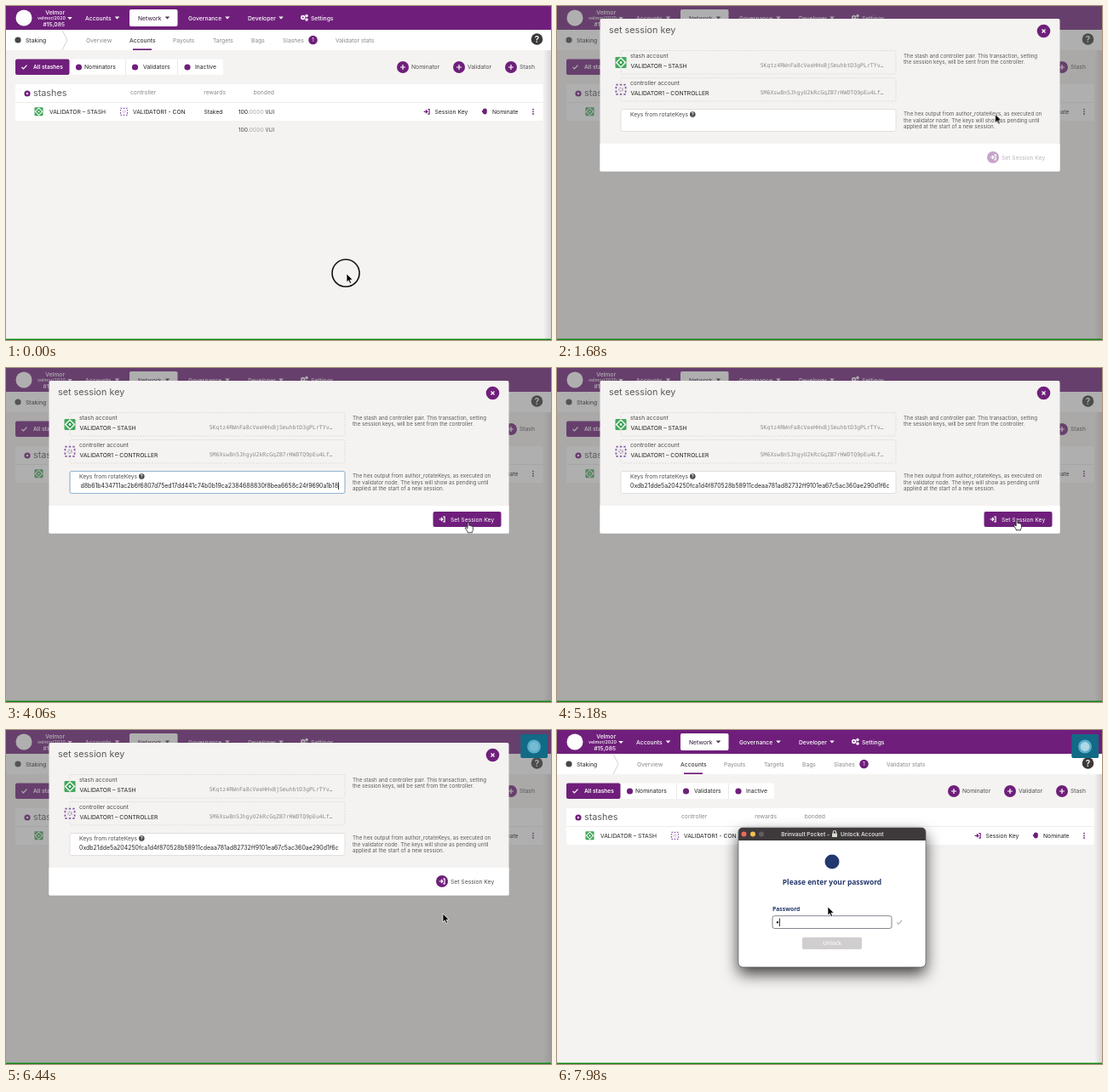
Animation, 640 px wide and 393 px high, one loop 8000 ms. Source, as an HTML page:

```html
<!DOCTYPE html>
<html lang="en">
<head>
<meta charset="utf-8">
<title>Staking session key</title>
<style>
html, body { margin: 0; width: 100%; height: 100%; overflow: hidden; background: #f5f3f1; }
svg { display: block; }
#stage { width: 100vw; height: 100vh; }
text { font: 6.75px Inter, "Liberation Sans", sans-serif; fill: #4e4e4e; white-space: pre; }
.purple { fill: #6f1f7b; }
.white, .white text { fill: #fff; }
.nav text { font-weight: 500; fill: #fff; }
.tabs text, .muted { fill: #8b8888; }
.tabs .on { fill: #3f3f3f; font-weight: 500; }
.title { font-size: 10.8px; font-weight: 400; fill: #5a5858; }
.dark { fill: #222; }
.bold { font-weight: 600; }
.end { text-anchor: end; }
.mid { text-anchor: middle; }
.help text { font-size: 6.2px; fill: #5c5a5a; }
.mono { font: 6.5px "DejaVu Sans Mono", monospace; fill: #8d8b8b; }
.hex { font-size: 6.94px; fill: #222; }
.line { fill: none; stroke: currentColor; stroke-width: 1.2; }
.dash { fill: none; stroke: #d9d6d4; stroke-width: .8; stroke-dasharray: 2 1.4; }
.popup text { font-family: "Noto Sans", "Open Sans", sans-serif; font-weight: 600; fill: #26396b; }
.popup .bar { font: 600 6.6px Inter, "Liberation Sans", sans-serif; fill: #dedbdc; }

/* timeline: one loop, hard switches */
.t { animation: 8s step-end infinite; }
.ring { animation-name: ring; }
.row-hover { animation-name: rowHover; }
.set { animation-name: set; }
.sign { animation-name: sign; }
.ready { animation-name: ready; }
.focus { animation-name: focus; }
.empty { animation-name: empty; }
.pasted { animation-name: pasted; }
.blurred { animation-name: blurred; }
.set-hover { animation-name: setHover; }
.sign-hover { animation-name: signHover; }
.status { animation-name: status; }
.sending { animation-name: sending; }
.window { animation-name: window; }
.typed { animation-name: typed; }
.arrow { animation-name: arrow; }
.hand { animation-name: hand; }
.beam { animation-name: beam; }
@keyframes ring { 0% { opacity: 1 } 1.75%, to { opacity: 0 } }
@keyframes rowHover { 0% { opacity: 0 } 11% { opacity: 1 } 18.4%, to { opacity: 0 } }
@keyframes set { 0% { opacity: 0 } 18.4% { opacity: 1 } 84%, to { opacity: 0 } }
@keyframes sign { 0% { opacity: 0 } 66.5% { opacity: 1 } 78.7%, to { opacity: 0 } }
@keyframes ready { 0% { opacity: .4 } 33.2%, to { opacity: 1 } }
@keyframes focus { 0% { opacity: 0 } 30% { opacity: 1 } 63.5%, to { opacity: 0 } }
@keyframes empty { 0% { opacity: 1 } 33.2%, to { opacity: 0 } }
@keyframes pasted { 0% { opacity: 0 } 33.2% { opacity: 1 } 63.5%, to { opacity: 0 } }
@keyframes blurred { 0% { opacity: 0 } 63.5%, to { opacity: 1 } }
@keyframes setHover { 0% { opacity: 0 } 46.3% { opacity: 1 } 66.5%, to { opacity: 0 } }
@keyframes signHover { 0% { opacity: 0 } 75.2% { opacity: 1 } 78.7%, to { opacity: 0 } }
@keyframes status { 0% { opacity: 0 } 66.5%, to { opacity: 1 } }
@keyframes sending { 0% { opacity: 0 } 78.7%, to { opacity: 1 } }
@keyframes window { 0% { opacity: 0 } 86.6%, to { opacity: 1 } }
@keyframes typed { 0% { opacity: 0 } 99.7%, to { opacity: 1 } }
@keyframes arrow { 0% { opacity: 1 } 11% { opacity: 0 } 18.4% { opacity: 1 } 24.8% { opacity: 0 }
  41% { opacity: 1 } 46.3% { opacity: 0 } 66.5% { opacity: 1 } 75.2% { opacity: 0 } 78.7%, to { opacity: 1 } }
@keyframes hand { 0% { opacity: 0 } 11% { opacity: 1 } 18.4% { opacity: 0 } 46.3% { opacity: 1 }
  66.5% { opacity: 0 } 75.2% { opacity: 1 } 78.7%, to { opacity: 0 } }
@keyframes beam { 0% { opacity: 0 } 24.8% { opacity: 1 } 41%, to { opacity: 0 } }

.blink { animation: blink 1s -340ms step-end infinite; }
@keyframes blink { 0% { opacity: 1 } 50%, to { opacity: 0 } }
.pulse { animation: pulse 2s ease-in-out infinite; }
@keyframes pulse { 0%, to { opacity: .95 } 22% { opacity: .3 } }

.pointer { animation: move 8s ease-in-out infinite; }
@keyframes move {
  0%, .9% { transform: translate(400px, 315px) }
  10.5% { transform: translate(510px, 125px) }
  12.5%, 20% { transform: translate(521px, 127px) }
  30.6%, 39.4% { transform: translate(163px, 146px) }
  49% { transform: translate(543px, 182px) }
  59.5%, 66.5% { transform: translate(540px, 179px) }
  70% { transform: translate(556px, 200px) }
  73.5% { transform: translate(556px, 207px) }
  76.1%, 78.7% { transform: translate(541px, 219px) }
  80.5% { transform: translate(513px, 216px) }
  88.4% { transform: translate(430px, 209px) }
  95%, to { transform: translate(318px, 208px) }
}
</style>
</head>
<body>
<svg id="stage" viewBox="0 0 640 393" preserveAspectRatio="none">
<defs>
  <path id="down" d="M-2.8-1.4h5.6L0 1.6z"/>
  <path id="enter" class="line" d="M-3.4 0h4m-1.7-2l2 2-2 2M1.3-2.8h1.8v5.6H1.3"/>
  <path id="plus" d="M-3 0h6M0-3v6" stroke="#fff" stroke-width="1.2"/>
  <g id="green">
    <rect x="-5" y="-5" width="10" height="10" rx="1" fill="#43a85c"/>
    <path d="M0-5L5 0 0 5-5 0z" fill="#e4f3e6"/>
    <path d="M0-3.2L3.2 0 0 3.2-3.2 0z" fill="#2f9a4b"/>
    <circle r="1.1" fill="#fff"/>
  </g>
  <g id="violet" fill="none" stroke="#8657a5">
    <rect x="-4" y="-4" width="8" height="8" stroke-width="1.2" stroke-dasharray="1.6 1.6"/>
    <circle r="1.5" stroke="#a893b5" stroke-dasharray="1 .8"/>
  </g>
  <g id="close">
    <circle cx="571.5" cy="29.5" r="7.8" class="purple"/>
    <path d="M569.5 27.5l4 4m0-4l-4 4" stroke="#fff" stroke-width="1.2"/>
  </g>
  <linearGradient id="edge"><stop stop-opacity="0"/><stop offset="1" stop-opacity=".12"/></linearGradient>
  <clipPath id="field"><rect x="84.5" y="130" width="308" height="16"/></clipPath>
  <clipPath id="frame"><rect x="213" y="115" width="220" height="164" rx="5"/></clipPath>
</defs>

<rect width="640" height="393" fill="#f5f3f1"/>

<g class="nav">
  <rect width="640" height="28" class="purple"/>
  <circle cx="21" cy="14" r="9.5" fill="#fff"/>
  <text x="69" y="10" class="end">Velmor</text>
  <text x="70" y="16.3" class="end" style="font-size:5.4px">velmor/2020</text>
  <text x="69" y="23.5" class="end">#15,085</text>
  <rect x="145" y="4" width="56.5" height="20" rx="2" fill="#fff"/>
  <text x="93" y="16.5">Accounts</text>
  <text x="155" y="16.5" style="fill:#4a3150">Network</text>
  <text x="214" y="16.5">Governance</text>
  <text x="284" y="16.5">Developer</text>
  <text x="358" y="16.5">Settings</text>
  <g fill="#fff">
    <use href="#down" x="75" y="14.5"/><use href="#down" x="130.5" y="14"/>
    <use href="#down" x="260" y="14"/><use href="#down" x="323" y="14"/>
  </g>
  <use href="#down" x="189.5" y="14" fill="#4a3150"/>
  <g fill="none" stroke="#fff" stroke-width="1.7">
    <circle cx="348.7" cy="13.5" r="1.8"/><circle cx="353" cy="11.6" r=".9"/><circle cx="353" cy="16" r=".9"/>
  </g>
</g>

<g class="tabs">
  <rect y="28" width="640" height="24" fill="#fff"/>
  <circle cx="14" cy="40" r="3.6" fill="#4a4648"/>
  <text x="23" y="42.6" class="on">Staking</text>
  <path d="M66 28.5l6 11.7-6 11.7" fill="none" stroke="#cfcccb" stroke-width=".9"/>
  <text x="94" y="42.6">Overview</text>
  <text x="145" y="42.6" class="on">Accounts</text>
  <rect x="149" y="50.3" width="22" height="1.7" class="purple"/>
  <text x="196" y="42.6">Payouts</text>
  <text x="243" y="42.6">Targets</text>
  <text x="288" y="42.6">Bags</text>
  <text x="325" y="42.6">Slashes</text>
  <circle cx="360.5" cy="40" r="5.3" class="purple"/>
  <text x="360.5" y="42.2" class="mid" style="font-size:6px;fill:#fff">1</text>
  <text x="387" y="42.6">Validator stats</text>
  <circle cx="623.5" cy="39" r="6.8" fill="#3b383a"/>
  <text x="623.5" y="42.6" class="mid bold" style="font-size:10px;fill:#fff">?</text>
</g>

<rect x="11" y="62.5" width="244" height="18.5" rx="2" fill="#fff"/>
<rect x="11" y="62.5" width="63.5" height="18.5" rx="2" class="purple"/>
<path d="M140.5 62.5V81M201.5 62.5V81" stroke="#e8e5e4" stroke-width=".8"/>
<path d="M18.5 72l2 2 4-4.3" class="line" color="#fff"/>
<text x="32" y="74.3" class="white bold" style="font-size:6.6px">All stashes</text>
<g class="purple"><circle cx="85.5" cy="72" r="3.6"/><circle cx="151.5" cy="72" r="3.6"/><circle cx="213" cy="72" r="3.6"/></g>
<text x="92" y="74.3" class="dark">Nominators</text>
<text x="161" y="74.3" class="dark">Validators</text>
<text x="222" y="74.3" class="dark">Inactive</text>

<g class="purple"><circle cx="466" cy="72" r="7"/><circle cx="532" cy="72" r="7"/><circle cx="593" cy="72" r="7"/></g>
<use href="#plus" x="466" y="72"/><use href="#plus" x="532" y="72"/><use href="#plus" x="593" y="72"/>
<text x="476" y="74.4">Nominator</text>
<text x="542" y="74.4">Validator</text>
<text x="603" y="74.4">Stash</text>

<rect x="11" y="92" width="619.5" height="43" rx="2" fill="#fff"/>
<path d="M11 113.5h619.5" stroke="#efedeb"/>
<circle cx="25" cy="103" r="3.6" class="purple"/><circle cx="25" cy="103" r="1.2" fill="#fff"/>
<text x="32" y="106" class="title">stashes</text>
<text x="146" y="104.2" class="muted">controller</text>
<text x="258" y="104.2" class="muted end">rewards</text>
<text x="315" y="104.2" class="muted end">bonded</text>
<use href="#green" x="38.5" y="124.3"/>
<text x="51" y="126.8" class="dark">VALIDATOR – STASH</text>
<use href="#violet" x="138.5" y="124.3"/>
<text x="149" y="126.8" class="dark">VALIDATOR1 - CON</text>
<text x="232.5" y="126.6" class="dark">Staked</text>
<text x="315" y="126.6" class="end dark">100.<tspan fill="#aaa">0000</tspan> <tspan font-size="5.8">VIJI</tspan></text>
<text x="315" y="147.8" class="end">100.<tspan fill="#aaa">0000</tspan> <tspan font-size="5.8">VIJI</tspan></text>
<use href="#enter" x="494" y="124.3" color="#6f1f7b"/>
<text x="503.5" y="126.8" class="dark">Session Key</text>
<g class="t row-hover white">
  <rect x="482.5" y="115" width="67.5" height="18" rx="2" class="purple"/>
  <use href="#enter" x="494" y="124.3" color="#fff"/>
  <text x="503.5" y="126.8">Session Key</text>
</g>
<path d="M558.5 123.3l1.4-.4.3-1.6 1.2-.5 1.2-.2 1.2.5 1 .9v3.2q-.3 2.3-2.5 2.4-1.4 0-2.2-1.4z" class="purple"/>
<text x="571" y="126.8" class="dark">Nominate</text>
<g class="purple"><circle cx="619" cy="121.6" r=".9"/><circle cx="619" cy="124.3" r=".9"/><circle cx="619" cy="127" r=".9"/></g>
<rect x="631" y="52" width="9" height="340" fill="url(#edge)"/>

<g class="t set">
  <rect width="640" height="392" fill="#606060" opacity=".5"/>
  <rect x="50.5" y="15" width="540" height="179.5" rx="2" fill="#f5f3f1"/>
  <path d="M50.5 162h540v32.5h-540z" fill="#fff"/>
  <text x="61" y="32.2" class="title">set session key</text>
  <use href="#close"/>
  <rect x="75" y="52.5" width="323" height="27.5" rx="2" class="dash"/>
  <rect x="75" y="84.5" width="323" height="27.5" rx="2" class="dash"/>
  <circle cx="75" cy="66.5" r="8" fill="#f0efed"/><circle cx="75" cy="98.3" r="8" fill="#f0efed"/>
  <use href="#green" transform="translate(75 66.5) scale(1.3)"/>
  <use href="#violet" transform="translate(75 98.3) scale(1.4)"/>
  <text x="86" y="61.2">stash account</text>
  <text x="86.5" y="73" class="dark">VALIDATOR – STASH</text>
  <text x="383.5" y="72" class="mono end">5Kqtz4RWnFa8cVeeHHxBjSmuhbtD3gPLrTYv…</text>
  <text x="86" y="93">controller account</text>
  <text x="86.5" y="104.8" class="dark">VALIDATOR1 – CONTROLLER</text>
  <text x="383.5" y="104" class="mono end">5M6Xsw8n5JhgyU2kRcGqZB7rHWDTQ9pEu4Lf…</text>
  <rect x="75" y="121.5" width="323" height="26" rx="2" fill="#fff" stroke="#dcd9d7" stroke-width=".8"/>
  <rect x="75" y="121.5" width="323" height="26" rx="2" fill="none" stroke="#8fb4d4" class="t focus"/>
  <text x="86" y="130.2">Keys from rotateKeys</text>
  <circle cx="159.3" cy="127.6" r="3.3" fill="#4e4a4c"/>
  <text x="159.3" y="129.7" class="mid bold" style="font-size:5.5px;fill:#fff">?</text>
  <g clip-path="url(#field)">
    <text x="390" y="141.3" class="hex end t pasted">d8b61b434711ac2b6f6807d75ed17dd441c74b0b19ca2384688830f8bea6658c24f9690a1b18</text>
    <text x="86" y="141.3" class="hex t blurred">0xdb21dde5a204250fca1d4f870528b58911cdeaa781ad82732ff9101ea67c5ac360ae290d1f6c</text>
  </g>
  <g class="t focus"><g class="t empty"><rect x="86" y="134.5" width=".8" height="8.5" class="blink"/></g></g>
  <g class="t pasted"><rect x="390.2" y="134.5" width=".8" height="8.5" class="blink"/></g>
  <g class="help">
    <text x="407" y="60.5">The stash and controller pair. This transaction, setting</text>
    <text x="407" y="67.8">the session keys, will be sent from the controller.</text>
    <text x="407" y="129.3">The hex output from author_rotateKeys, as executed on</text>
    <text x="407" y="136.6">the validator node. The keys will show as pending until</text>
    <text x="407" y="143.9">applied at the start of a new session.</text>
  </g>
  <g class="t ready">
    <circle cx="512" cy="178" r="7" class="purple"/>
    <use href="#enter" x="512" y="178" color="#fff"/>
    <text x="522" y="180.5">Set Session Key</text>
  </g>
  <g class="t set-hover white">
    <rect x="501.5" y="169" width="80" height="18" rx="2" class="purple"/>
    <use href="#enter" x="512" y="178" color="#fff"/>
    <text x="522" y="180.5">Set Session Key</text>
  </g>
</g>

<g class="t sign">
  <rect width="640" height="392" fill="#606060" opacity=".5"/>
  <rect x="50.5" y="15" width="540" height="222" rx="2" fill="#f5f3f1"/>
  <path d="M50.5 204.5h540V237h-540z" fill="#fff"/>
  <text x="61" y="32.2" class="title">authorize transaction</text>
  <use href="#close"/>
  <text x="61" y="58.2" class="dark" style="font-size:6.93px;font-weight:500">Sending transaction session.setKeys(keys, proof)</text>
  <g class="help">
    <g style="--size:6.5px">
      <text x="61" y="66.8" style="font-size:var(--size);fill:#7d7a7a">Sets the session key(s) of the function caller to keys. Allows an account to set its session key prior</text>
      <text x="61" y="75" style="font-size:var(--size);fill:#7d7a7a">to becoming a validator. This doesn't take effect until the next session.</text>
    </g>
    <text x="407" y="60.5">The details of the transaction including the type, the</text>
    <text x="407" y="67.8">description (as available from the chain metadata) as well</text>
    <text x="407" y="75.1">as any parameters and fee estimations (as available) for</text>
    <text x="407" y="82.4">the specific type of call.</text>
    <text x="407" y="108.3">The sending account that will be used to send this</text>
    <text x="407" y="115.6">transaction. Any applicable fees will be paid by this</text>
    <text x="407" y="122.9">account.</text>
    <text x="407" y="145.8">Adding an optional tip to the transaction could allow for</text>
    <text x="407" y="153.1">higher priority, especially when the chain is busy.</text>
    <text x="407" y="169.5">The call hash as calculated for this transaction</text>
  </g>
  <use href="#down" x="392" y="65" fill="#222"/>
  <text x="61" y="88.8" class="dark" style="font-size:6.85px;font-weight:500">Fees of 29.7434 milli VIJI will be applied to the submission</text>
  <rect x="75" y="101" width="323" height="27.5" rx="2" class="dash"/>
  <circle cx="75" cy="114.5" r="8" fill="#f0efed"/>
  <use href="#violet" transform="translate(75 114.5) scale(1.4)"/>
  <text x="86" y="109.2">sending from my account</text>
  <text x="86.5" y="121" class="dark">VALIDATOR1 – CONTROLLER</text>
  <text x="383.5" y="120" class="mono end">5M6Xsw8n5JhgyU2kRcGqZB7rHWDTQ9pEu4Lf…</text>
  <text x="373.5" y="144.3" class="end" style="font-size:6.85px">Do not include a tip for the block author</text>
  <rect x="377" y="136.5" width="21.5" height="10.5" rx="5.2" fill="#e2dfde"/><circle cx="382.3" cy="141.7" r="4.8" fill="#fff"/>
  <rect x="75" y="162" width="323" height="26.5" rx="2" class="dash"/>
  <text x="86" y="170.3">call hash</text>
  <text x="86" y="181.2" class="hex">0x09337615bfe8de2c490195cc259fbbc46a94a444a9596915f999d8fbbd82bece</text>
  <circle cx="386.5" cy="175.3" r="7.8" class="purple"/>
  <path d="M383.5 172.2h3.5v4.6h-3.5zM386 174.3h3.5v4.4H386z" fill="#fff" stroke="#6f1f7b" stroke-width=".5"/>
  <text x="65" y="223.8">Sign and Submit</text>
  <rect x="121" y="216" width="21.5" height="10.5" rx="5.2" class="purple"/><circle cx="137.2" cy="221.2" r="4.5" fill="#fff"/>
  <circle cx="511.5" cy="220.5" r="7" class="purple"/>
  <use href="#enter" x="511.5" y="220.5" color="#fff"/>
  <text x="522" y="223" class="dark">Sign and Submit</text>
  <g class="t sign-hover white">
    <rect x="501" y="211.5" width="80.5" height="18" rx="2" class="purple"/>
    <use href="#enter" x="511.5" y="220.5" color="#fff"/>
    <text x="522" y="223">Sign and Submit</text>
  </g>
</g>

<g class="t status">
  <rect x="604.5" y="5" width="31.5" height="28" rx="2" fill="#12718f"/>
  <path d="M611 14.7h3.5l8.4 9.2h3.6M611 23.9h3.5l8.4-9.2h3.6" fill="none" stroke="#fff" stroke-width="2.1"/>
  <path d="M625.5 11.4l4.4 3.3-4.4 3.3zM625.5 20.6l4.4 3.3-4.4 3.3z" fill="#fff"/>
  <g class="t sending">
    <rect x="604.5" y="5" width="31.5" height="28" rx="2" fill="#126a86"/>
    <circle cx="620" cy="19.5" r="8" fill="#5aaeca"/>
    <circle cx="620" cy="19.5" r="5.4" fill="#b5dae6" class="pulse"/>
  </g>
</g>

<g class="t window popup">
  <rect x="213" y="115" width="220" height="164" rx="5" style="filter:drop-shadow(0 8px 9px rgba(0,0,0,.75))"/>
  <g clip-path="url(#frame)">
    <rect x="213" y="115" width="220" height="164" fill="#fff"/>
    <rect x="213" y="115" width="220" height="15" fill="#3e3a3c"/>
  </g>
  <rect x="213" y="115" width="220" height="164" rx="5" fill="none" stroke="#555" stroke-width=".6"/>
  <circle cx="219.5" cy="122.5" r="3" fill="#ec695e"/><circle cx="230" cy="122.5" r="3" fill="#f4be4f"/><circle cx="240" cy="122.5" r="3" fill="#625e60"/>
  <text x="320" y="125" class="bar end">Brinvault Pocket -</text>
  <text x="333" y="125" class="bar">Unlock Account</text>
  <rect x="323" y="121.5" width="6" height="4.5" rx=".6" fill="#d8dbd0"/>
  <path d="M324.3 121.5v-1.3a1.7 1.7 0 0 1 3.4 0v1.3" class="line" color="#d8dbd0"/>
  <circle cx="323" cy="155" r="8.5" fill="#22386f"/>
  <text x="323" y="182" class="mid" style="font-size:8.45px">Please enter your password</text>
  <text x="253" y="212.5" style="font-size:6.8px">Password</text>
  <rect x="253" y="218.7" width="140" height="14.8" rx="2.5" fill="#fff" stroke="#626770" stroke-width=".8"/>
  <path d="M399 226.3l2 2 4-4.3" class="line" color="#b5b5b5"/>
  <rect x="288" y="244" width="70" height="14" rx="2" fill="#d0cece"/>
  <text x="323" y="253.3" class="mid" style="font-size:6.3px;fill:#f3f2f2">Unlock</text>
  <g class="t typed"><circle cx="259" cy="226.3" r="1.2" fill="#222"/><rect x="261" y="221.5" width=".8" height="9.5"/></g>
</g>

<rect y="391.6" width="640" height="1.4" fill="#0a860f"/>

<g class="pointer">
  <circle cx="-1" cy="-.7" r="16" fill="none" stroke="#111" stroke-width="1.6" class="t ring"/>
  <path class="t arrow" d="M0 0v10l2.3-2.1 1.6 3.7 1.7-.8L4 7.2h3.2z" stroke="#fff" stroke-width=".7"/>
  <path class="t hand" d="M-.9 0Q0-1 .9 0v3.6q1-.7 1.6.3 1.1-.5 1.6.5 1.2-.2 1.4 1v3q-.2 1.4-1 2.4v1H-.8v-1L-3.4 7q-.6-1.5.8-1.4L-.9 7z" fill="#fff" stroke="#111" stroke-width=".8"/>
  <path class="t beam" d="M-2-5.2q2 0 2 1v8.4q0 1-2 1M2-5.2q-2 0-2 1m0 8.4q0 1 2 1M-1.2 1.8h2.4" fill="none" stroke="#111" stroke-width="1"/>
</g>
</svg>
</body>
</html>
```
